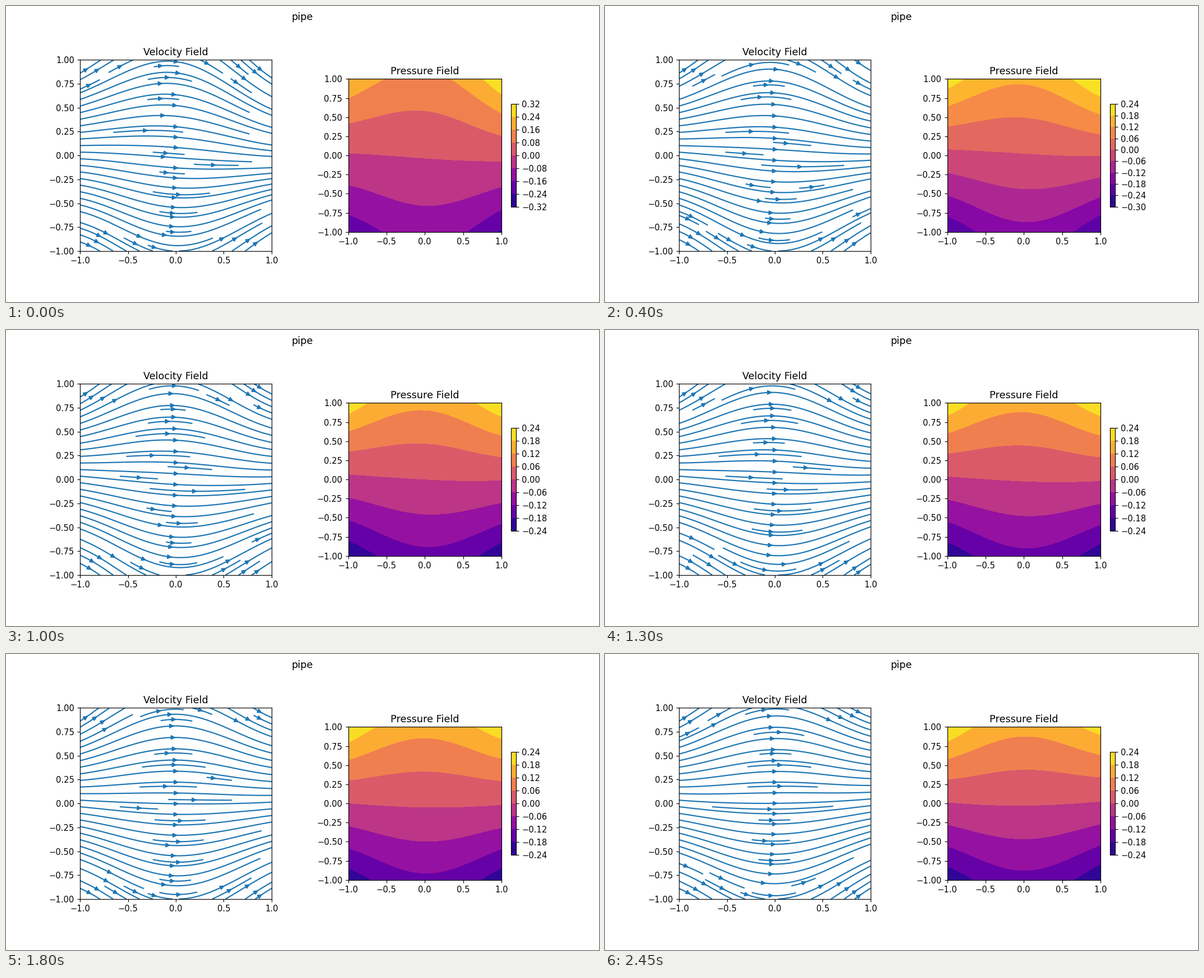
Recreate the animation shown at these times as a matplotlib script. Size 1058x529 px, loop 2500 ms.

```python
import numpy as np
import matplotlib.pyplot as plt
from matplotlib.animation import FuncAnimation

FRAMES, STEP = 50, 0.05  # seconds per frame

axis = np.linspace(-1, 1, 61)
X, Y = np.meshgrid(axis, axis)
# Slight extra curvature towards the inlet.
BEND = .015 * axis**2 * (1 - axis)


def fade(t, tau):
    return np.exp(-t / tau)


def flow(t, left, right):
    """Streamlines are y = c*G(x) + H(x) - BEND*c^2, c being the height
    at mid-pipe; left and right are the values of G at both ends."""
    x = axis
    even = ((left + right) / 2) ** (1.38 * x**2 - .38 * x**4)
    g = even + (right - left) / 2 * x
    h_left = .05 + .02 * np.sin(2 * np.pi * t / 2.9)
    h_right = -.02 + .011 * t**2 - .036 * fade(t, .15)
    h = (h_left + h_right) / 2 * x**2
    h += (h_right - h_left) / 2 * (1.4 * x - .4 * x**3)
    c = 2 * (Y - h) / (g + np.sqrt(g**2 - 4 * BEND * (Y - h)))
    return g, h, c


def slope(t):
    left = .6 + .005 * t**2 + .045 * fade(t, .15)
    right = .65 - .1 * fade(t, 1.1)
    g, h, c = flow(t, left, right)
    dg, dh, db = (np.gradient(f, axis, edge_order=2) for f in (g, h, BEND))
    return (dg * c + dh - db * c**2) / 1


def pressure(t):
    c = flow(t, .65, .68 - .14 * fade(t, .7))[2]
    shift = -.01 + .04 * np.cos(2 * np.pi * (t - .4) / 3) - .052 * fade(t, .12)
    s = c - shift
    return s * (.126 + .008 * s**2) * np.where(s < 0, 1 + .03 * t, 1)


def level_range(t):
    if t < .15:
        return -4, 4, .08
    return (-5 if t < .5 else -4), 4, .06


fig = plt.figure(figsize=(10, 5), dpi=105.8)
fig.suptitle("pipe")
SLOT, MID, HIGH = .775 / 2.4, .495, .77
RIGHT_X = .125 + 1.4 * SLOT


def make_axes(left, width, title):
    ax = fig.add_axes([left, MID - HIGH / 2, width, HIGH])
    ax.set(title=title, xlim=(-1, 1), ylim=(-1, 1), aspect="equal",
           xticks=np.linspace(-1, 1, 5), yticks=np.linspace(-1, 1, 9))
    return ax


vel_ax = make_axes(.125, SLOT, "Velocity Field")
prs_ax = make_axes(RIGHT_X, .8 * SLOT, "Pressure Field")

BAR_HIGH = .45 * HIGH
BAR_BOX = [RIGHT_X + .85 * SLOT, MID - BAR_HIGH / 2, BAR_HIGH / 40, BAR_HIGH]
shown = {"artists": [], "range": None, "bar": None}


def draw_bar(filled, levels):
    if shown["bar"] is not None:
        shown["bar"].remove()
    shown["bar"] = fig.add_axes(BAR_BOX)
    fig.colorbar(filled, cax=shown["bar"], ticks=levels)


def update(frame):
    t = frame * STEP
    for artist in shown["artists"] + list(vel_ax.patches):
        artist.remove()

    stream = vel_ax.streamplot(axis, axis, np.ones_like(X), slope(t),
                               color="C0")

    low, high, step = level_range(t)
    levels = np.arange(low, high + 1) * step
    p = np.clip(pressure(t), levels[0] + 1e-4, levels[-1] - 1e-4)
    filled = prs_ax.contourf(X, Y, p, levels=levels, cmap="plasma")
    if shown["range"] != (low, high, step):
        draw_bar(filled, levels)
        shown["range"] = (low, high, step)

    shown["artists"] = [stream.lines, filled]
    return []


anim = FuncAnimation(fig, update, frames=FRAMES, interval=1000 * STEP,
                     init_func=lambda: [], repeat=True, blit=False)
plt.show()
```
